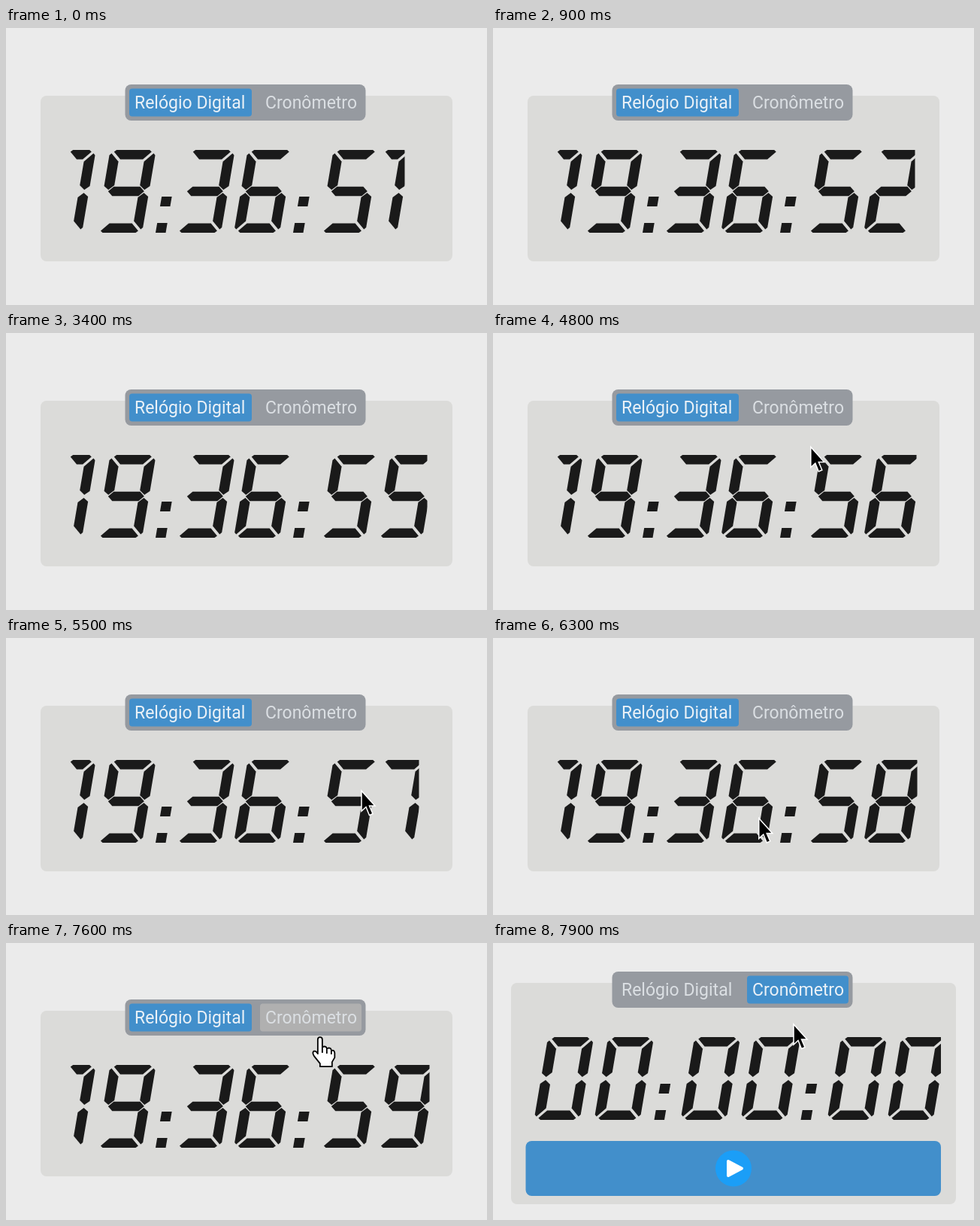
Recreate the animation shown at these times as an HTML page. Size 640x368 px, loop 8 s.

```html
<!DOCTYPE html>
<html lang="pt">
<head>
<meta charset="utf-8">
<title>Relógio Digital</title>
<style>
html, body { margin: 0; width: 100%; height: 100%; overflow: hidden; background: #ebebeb; }
svg { display: block; width: 640px; height: 368px; }
text { font: 400 23px Roboto, sans-serif; fill: #dbdfe3; }
text.on { fill: #eaf1f7; }
.panel { fill: #dbdbd9; }
.bar { fill: #969aa0; }
.blue { fill: #428fcb; }
.ink { fill: #1a1a1a; }
</style>
</head>
<body>
<svg viewBox="0 0 640 368">
  <defs><clipPath id="clip"><rect id="clipBox" height="368"/></clipPath></defs>
  <rect id="panel" class="panel" rx="8"/>
  <g id="stopwatch">
    <rect class="blue" x="43.500" y="263" width="552.500" height="73" rx="8"/>
    <circle cx="320" cy="299.500" r="24" fill="#1b9ef7"/>
    <path d="M313 290V309L331 299.500Z" fill="#fff" stroke="#fff" stroke-width="4" stroke-linejoin="round"/>
  </g>
  <g id="face">
    <rect class="bar" x="158.500" y="75" width="320" height="48" rx="8"/>
    <rect id="tab" class="blue" y="80.500" height="37" rx="4"/>
    <rect id="hover" x="338" y="80.500" width="135" height="37" rx="4" fill="#b0b0b0"/>
    <text id="clockLabel" x="171" y="106.500">Relógio Digital</text>
    <text id="watchLabel" x="345" y="106.500">Cronômetro</text>
    <g clip-path="url(#clip)"><g id="digits" class="ink"></g></g>
  </g>
  <path id="arrow" d="M0 0V27L6 21.500L10.500 32.500L15 30.500L10.500 20H18Z" fill="#000" stroke="#fff" stroke-width="1.500"/>
  <path id="hand" d="M-3 3Q-3 0 0 0Q3 0 3 3V20V13Q8 11 9 15V21V15Q14 13 15 17V22V18Q19 16 19.500 21V27L16 33V39H0V35L-8 25Q-11 20 -8 18.500Q-5 18 -3 22Z" fill="#fff" stroke="#000" stroke-width="1.800" stroke-linejoin="round"/>
</svg>
<script>
const LOOP = 8000, STEP = 100, SWITCH = 7800;
const W = 61, H = 110, SLANT = 0.17, BEARING = 8.5;
const $ = id => document.getElementById(id);

// Three upright segment shapes; mirroring gives the rest.
const TOP = [[5.5, 2.5], [8.5, 0], [52.5, 0], [55.5, 2.5], [45.5, 12.5], [15.5, 12.5]];
const SIDE = [[2.5, 4.5], [13.5, 15.5], [13.5, 47], [6.5, 53], [0, 48], [0, 7]];
const MID = [[6.5, 55], [13, 48.7], [48, 48.7], [54.5, 55], [48, 61.3], [13, 61.3]];
const flipX = pts => pts.map(([x, y]) => [W - x, y]);
const flipY = pts => pts.map(([x, y]) => [x, H - y]);
const dot = y => [[0, y], [13.5, y], [13.5, y + 13], [0, y + 13]];
const SEG = {
  a: TOP, b: flipX(SIDE), c: flipX(flipY(SIDE)), d: flipY(TOP),
  e: flipY(SIDE), f: SIDE, g: MID,
  t: TOP.map(([x, y]) => [x < W / 2 ? x + 22 : x, y]),
  u: dot(62), l: dot(97)
};
// Segments, advance width, empty space trimmed from the left.
const GLYPH = {
  0: ['abcdef', 80, 0], 1: ['tbc', 46, 34], 2: ['abged', 77, 0], 3: ['abgcd', 69, 9],
  4: ['fgbc', 77, 0], 5: ['afgcd', 76, 0], 6: ['afgecd', 79, 0], 7: ['abc', 65, 12],
  8: ['abcdefg', 80, 0], 9: ['abcdfg', 79, 0], ':': ['ul', 35, 0]
};
// Pointer key points: time, x, y.
const PATH = [
  [4400, 588, 13], [5000, 365, 200], [5500, 473, 203], [6000, 403, 312],
  [6500, 327, 200], [6900, 352, 124], [7100, 416, 127], [7700, 418, 125], [7900, 400, 108]
];

function pointer(t) {
  const i = Math.max(1, PATH.findIndex(p => p[0] >= t));
  const [t0, x0, y0] = PATH[i - 1], [t1, x1, y1] = PATH[i];
  const k = (t - t0) / (t1 - t0), e = k * k * (3 - 2 * k);
  return [x0 + (x1 - x0) * e, y0 + (y1 - y0) * e];
}

function set(el, attrs) {
  for (const k in attrs) el.setAttribute(k, attrs[k]);
}

const show = (el, on) => el.style.display = on ? '' : 'none';

// Sets the digits from left to right and clips at the end of the line.
function write(str, pen) {
  let out = '';
  for (const ch of str) {
    const [segs, advance, trim] = GLYPH[ch];
    const polys = [...segs].map(s => `<polygon points="${SEG[s].join(' ')}"/>`).join('');
    const x = pen + BEARING - trim + SLANT * H;
    out += `<g transform="matrix(1 0 ${-SLANT} 1 ${x} 162)">${polys}</g>`;
    pen += advance;
  }
  $('digits').innerHTML = out;
  set($('clipBox'), { width: pen });
}

function render(t) {
  const watch = t >= SWITCH, hover = t >= 6800 && !watch;

  set($('panel'), watch
    ? { x: 24, y: 53, width: 592, height: 294 }
    : { x: 46, y: 90, width: 548, height: 220 });
  set($('face'), { transform: `translate(0 ${watch ? -37 : 0})` });
  set($('tab'), watch ? { x: 338, width: 135 } : { x: 164, width: 163 });
  $('clockLabel').classList.toggle('on', !watch);
  $('watchLabel').classList.toggle('on', watch);
  show($('stopwatch'), watch);
  show($('hover'), hover);

  if (watch) write('00:00:00', 46);
  else write('19:36:' + (51 + Math.floor((t + 700) / 1000)), 65.5);

  const at = `translate(${pointer(t).join(' ')})`;
  for (const id of ['arrow', 'hand']) {
    show($(id), t >= PATH[0][0] && hover === (id === 'hand'));
    set($(id), { transform: at });
  }
}

let last = -1;
function tick() {
  const t = Math.floor(performance.now() % LOOP / STEP) * STEP;
  if (t !== last) render(last = t);
  requestAnimationFrame(tick);
}
tick();
</script>
</body>
</html>
```
